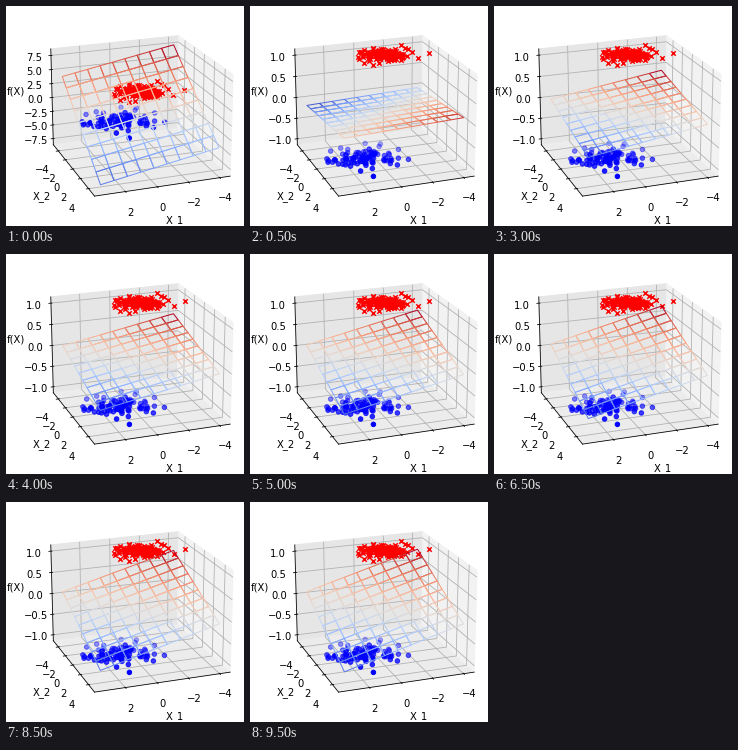
Animation, 238 px wide and 220 px high, one loop 10000 ms. Source, as a matplotlib script:

```python
import numpy as np
import matplotlib.pyplot as plt
from matplotlib.animation import FuncAnimation

WIDTH, HEIGHT, DPI = 238, 220, 72
FRAMES, INTERVAL = 20, 500
SIDE = 217.44                # side of the square 3D axes, in pixels
LEFT, BOTTOM = 21.2, 3.0
PAD = 1.1 * 25 / 24          # axis limits relative to the data range

# A hair over the pixel size guards against rounding down.
fig = plt.figure(figsize=((WIDTH + 1e-9) / DPI, (HEIGHT + 1e-9) / DPI),
                 dpi=DPI, facecolor="white")
ax = fig.add_axes([LEFT / WIDTH, BOTTOM / HEIGHT, SIDE / WIDTH, SIDE / HEIGHT],
                  projection="3d")
ax.view_init(elev=20, azim=70)

X_MID, X_HALF, Y_HALF = -0.405, 3.745, 4.75
ax.set_xlim(X_MID - X_HALF * PAD, X_MID + X_HALF * PAD)
ax.set_ylim(-Y_HALF * PAD, Y_HALF * PAD)
ax.set_xticks(np.arange(-4, 3, 2))
ax.set_yticks(np.arange(-4, 5, 2))
ax.tick_params(axis="y", pad=6)
ax.set_xlabel("X_1")
ax.set_ylabel("X_2", labelpad=5.5)
ax.set_zlabel("f(X)")
for axis, gray in ((ax.xaxis, 0.95), (ax.yaxis, 0.9), (ax.zaxis, 0.925)):
    axis.set_pane_color((gray, gray, gray, 1))


def cluster(rng, center, spread, count, outlier):
    """Normal cloud with trimmed tails plus one far point."""
    offsets = np.clip(rng.normal(size=(count, 2)), -2.4, 2.4)
    return np.vstack([center + offsets * spread, outlier]).T


rng = np.random.default_rng(4)
blue = cluster(rng, (0.95, 0.05), (1.05, 1.1), 100, (1.34, 4.0))
red = cluster(rng, (-1.45, -3.0), (0.75, 0.9), 125, (-4.15, -2.35))
ax.scatter(*blue, -1, c="blue", marker="o")
ax.scatter(*red, 1, c="red", marker="x", depthshade=False)

u, v = np.meshgrid(np.linspace(-1, 1, 10), np.linspace(-1, 1, 10))
surface = None


def slopes(step):
    """Tilt of the fitted plane along both axes after a training step."""
    if step == 0:
        return 1.75, 5.8
    return (0.43 - 0.41 * np.exp(-0.091 * step),
            0.493 - 0.67 * np.exp(-0.135 * step))


def update(step):
    global surface
    if surface is not None:
        surface.remove()
    slope_x, slope_y = slopes(step)
    z = -slope_x * u - slope_y * v
    top, tick = (z.max(), 2.5) if step == 0 else (1, 0.5)
    ax.set_zlim(-top * PAD, top * PAD)
    ticks = tick * np.arange(-3, 4) if step == 0 else tick * np.arange(-2, 3)
    ax.set_zticks(ticks)
    colors = plt.cm.coolwarm((z - z.min()) / np.ptp(z))
    surface = ax.plot_surface(X_MID + X_HALF * u, Y_HALF * v, z,
                              facecolors=colors, shade=False)
    surface.set_facecolor((0, 0, 0, 0))
    return (surface,)


anim = FuncAnimation(fig, update, frames=FRAMES, interval=INTERVAL,
                     repeat=True, repeat_delay=0, blit=False)
plt.show()
```
